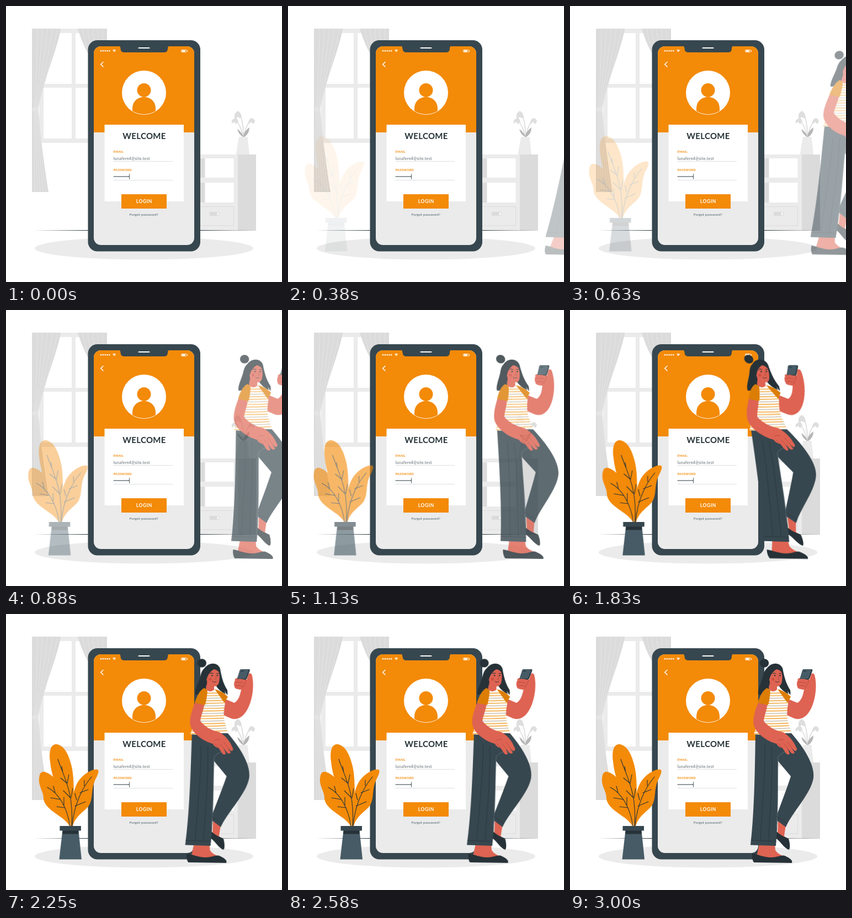
These frames come from a looping animation (500 px wide and 500 px high, 3.04 s). An HTML page:

```html
<!DOCTYPE html>
<html lang="en">
<head>
<meta charset="utf-8">
<title>Login</title>
<style>
  html, body { margin: 0; width: 100%; height: 100%; overflow: hidden; background: #fff; }
  svg { display: block; width: 100vw; height: 100vh; }
  text { font-family: Lato, "Open Sans", sans-serif; }
  .orange { fill: #f38a08; }
  .slate { fill: #37474f; }
  .ink { fill: #263238; }
  .skin { fill: #de6352; }
  .pale { fill: #ebebeb; }
  .grey { fill: #dbdbdb; }
  .line { fill: none; stroke-linecap: round; stroke-linejoin: round; }
  .vein { stroke: #263238; stroke-width: 1.1; }
  .fold { stroke: #a9443a; stroke-width: .7; }
  .seam { stroke: #263238; stroke-width: .7; }
  #woman { transform-origin: 387px 267px; }
</style>
</head>
<body>
<svg viewBox="0 0 500 500">
  <defs>
    <clipPath id="disc"><circle cx="250" cy="157" r="39.3"/></clipPath>
    <clipPath id="screen"><rect x="159" y="73" width="182" height="360" rx="13"/></clipPath>
    <clipPath id="top"><path d="M361 136Q368 143 376 136L389 141Q396 152 395 164Q391 183 396 199L401 214Q366 220 333 218Q339 200 349 180L357 150Z"/></clipPath>
  </defs>

  <!-- window -->
  <path class="pale" fill-rule="evenodd" d="M60 41H175V248H60ZM68 49V141H119V49ZM126 49V141H170V49ZM68 148V240H119V148ZM126 148V240H170V148Z"/>
  <path class="grey" d="M47 41H99.5C90 88 63 148 59 184V191C61 230 70 292 77 337H47Z"/>
  <path class="grey" d="M130 41H183V100H158C148 87 139 70 130 41Z"/>
  <g id="folds" class="line" stroke="#e8e8e8" stroke-width=".8"></g>
  <rect x="48" y="184" width="11" height="7" fill="#e4e4e4"/>

  <!-- cabinet and flowers -->
  <path class="pale" d="M350 269H420V406H350Z"/>
  <path class="grey" d="M420 269H453V407H420Z"/>
  <path class="grey" d="M350 276H361V311H350ZM350 320H361V356H350Z"/>
  <path fill="#fff" d="M360.500 276H412.500V311H360.500ZM360.500 320H412.500V356H360.500Z"/>
  <path class="line" stroke="#dbdbdb" d="M350 363.500H412.500V398H350"/>
  <rect class="grey" x="369" y="373" width="18" height="7" rx="1"/>
  <rect x="382.500" y="374" width="3.500" height="5" fill="#f5f5f5"/>
  <g class="line" stroke="#c6c6c6" stroke-width="1">
    <path d="M430 237C430 220 429 206 422 193M429 237C427 222 421 211 415 205M430 237C434 220 439 211 445 204"/>
  </g>
  <path fill="#b5b5b5" d="M430 237Q431 227 441 220Q441 231 432 237ZM429 237Q421 232 419 223Q427 228 430 237Z"/>
  <path fill="#dedede" d="M420 190C412 194 413 202 416 206Q419 201 420 201Q423 204 427 203Q427 194 420 190ZM416 203Q407 205 409 213L413 210L417 214L421 210Q421 205 416 203ZM445 203Q437 206 440 214L444 210L448 214L451 209Q450 204 445 203Z"/>
  <path class="pale" d="M422 237H437.500L441 269H416.500Z"/>

  <ellipse class="pale" cx="250" cy="439" rx="198" ry="20.500"/>
  <path class="ink" d="M50 406.500L150 406V407ZM350 406L453 406.500L350 407Z"/>

  <!-- phone -->
  <rect class="slate" x="148.500" y="62" width="203.500" height="382.500" rx="17"/>
  <g clip-path="url(#screen)">
    <rect class="pale" x="159" y="73" width="182" height="360"/>
    <rect class="orange" x="159" y="73" width="182" height="156"/>
    <path class="slate" d="M204 72Q207.500 73 207.500 77Q207.500 84 214 84H287Q293 84 293 77Q293 73 296 72Z"/>
  </g>
  <path class="line" stroke="#fff" stroke-width="2" d="M240.500 76H259.500"/>
  <g id="signal" fill="#fff"></g>
  <path fill="#ffe0b5" d="M193 80Q196 77.500 199.300 80L196.100 83.800Z"/>
  <rect x="317.500" y="79.500" width="10" height="4" rx="1" fill="none" stroke="#fff" stroke-width=".8"/>
  <path fill="#fff" d="M318.500 80.300H325V82.800H318.500ZM328 80.500H329V82.500H328Z"/>
  <path class="line" stroke="#fff" stroke-width="1.500" d="M176 101.500L171.700 105.700L176 110"/>
  <circle cx="250" cy="157" r="40" fill="#fff"/>
  <g class="orange" clip-path="url(#disc)">
    <circle cx="250" cy="152.500" r="12.500"/>
    <path d="M229 200V186C229 173 238 165 250 165S271 173 271 186V200Z"/>
  </g>
  <rect x="178.500" y="215" width="143.500" height="139" fill="#fff"/>
  <text class="ink" x="250.500" y="241" font-size="15" font-weight="700" letter-spacing=".3" text-anchor="middle">WELCOME</text>
  <g class="orange" font-size="5.600" font-weight="700" letter-spacing=".25">
    <text x="194.700" y="266">EMAIL</text>
    <text x="194.700" y="299.300">PASSWORD</text>
  </g>
  <text x="194.700" y="278.500" font-size="7" letter-spacing=".35" fill="#5b656a">lunafern4@site.test</text>
  <path class="line" stroke="#cfd2d4" stroke-width=".7" d="M195 281.500H301.500M195 315.500H301.500"/>
  <g id="dots" class="slate"></g>
  <path class="line" stroke="#263238" stroke-width=".8" d="M223.500 304.500V313.500"/>
  <rect class="orange" x="209" y="341" width="82" height="26"/>
  <text x="250.300" y="357.300" font-size="8.500" font-weight="700" letter-spacing=".6" text-anchor="middle" fill="#fff">LOGIN</text>
  <text x="250" y="380" font-size="6.300" letter-spacing=".22" text-anchor="middle" fill="#455a64">Forgot password?</text>

  <g id="plant">
    <g class="orange">
      <path d="M115 384C113 354 82 314 78 267C75 243 82 235 90 236C104 238 112 255 117 276C123 302 121 345 117 384Z"/>
      <path d="M113 384C104 366 70 357 66 335C67 322 57 314 58 298C59 286 64 284 71 287C86 292 101 316 107 337C112 356 114 370 114 384Z"/>
      <path d="M117 384C114 352 117 330 125 311C132 294 151 281 163 281.500C169 283 163 294 159 302C152 318 156 334 149 346C142 357 125 364 119 384Z"/>
    </g>
    <g class="line vein">
      <path d="M92 263C104 298 121 324 117 384M101 287L99 276M109 307L97 297M109 307L112 291M115 333L102 320M116 333L119 316"/>
      <path d="M73 314C93 324 109 350 114 384M87 324L84 312M97 336L79 333M105 351L90 349M103 347L103 332"/>
      <path d="M153 295C136 315 121 346 118 384M140 311L140 301M132 324L147 318M126 337L123 325M123 348L142 340"/>
    </g>
    <path d="M100.500 392H129.500L135 444.500H94.500Z" fill="#465b66"/>
    <path class="ink" d="M101 391H129.500V398.500H100Z"/>
    <rect class="slate" x="95.500" y="384" width="38.500" height="8.500"/>
  </g>

  <g id="woman">
    <!-- hair behind -->
    <g class="ink">
      <ellipse cx="352" cy="89" rx="8.200" ry="7.800"/>
      <path d="M357 98C365 87 380 87 385 98C388 112 390 124 399 138Q400 143 399 147L394 139L396 145Q384 140 377 128L362 132C360 140 352 147 341 146C339 137 348 122 350 111Q352 102 357 98Z"/>
    </g>
    <!-- raised arm -->
    <path class="skin" d="M388 151L412 161C420 156 422 147 424 137L414 135Q410 132 413 128Q409 124 413 121Q411 117 416 116L434 119L437 109Q440 105 443 110C448 128 445 151 439 166C432 184 420 194 406 189L390 182Z"/>
    <path class="ink" d="M421 102Q422 100 424 100H437Q440 100 439 103L434 117Q433 119 431 119L417 118Z"/>
    <path fill="#465b66" d="M421 102Q422 100 424 100H435Q438 100 437 103L432 117L416 118Z"/>
    <path class="line" stroke="#263238" stroke-width="1.500" d="M424 103.500H427"/>
    <path class="skin" d="M414 119Q420 116 430 119L433 125Q432 133 426 137Q413 137 412 131Q409 127 413 124Q411 121 414 119Z"/>
    <path class="line fold" d="M414 124Q421 122 427 125M414 130Q420 128 426 131M433 119Q432 126 426 134"/>

    <!-- feet -->
    <path class="skin" d="M377 371L391 382L388 402L392 407L376 401Z"/>
    <path class="ink" d="M374 394Q383 402 392 405L396 407C399 416 399 427 396 427C388 424 381 412 374 407Z"/>
    <path class="skin" d="M343 416H371L372 428Q378 437 390 439L372 446L338 440Z"/>
    <path class="ink" d="M330 434C340 435 351 441 364 441C376 441 383 436 389 438C398 442 404 446 402 451L333 450Q329 444 330 434Z"/>

    <!-- trousers -->
    <path class="slate" d="M360 216H401C423 241 444 273 441 297C437 325 402 360 391 386L372 372C382 344 393 316 400 294L374 263Z"/>
    <path class="slate" d="M336 216H390Q396 237 377 258C376 310 378 363 373 420L327 418.500C334 360 335 280 336 216Z"/>
    <path class="line" stroke="#6c7a82" stroke-width=".7" d="M377 259C376 310 377 350 374 386M377 258Q390 246 397 250"/>
    <path class="line seam" d="M328 410L373 412M353 238C354 300 347 360 345 410M365 240C368 300 362 350 360 411M374 366L393 380"/>

    <!-- top -->
    <g clip-path="url(#top)">
      <rect x="330" y="133" width="75" height="88" fill="#fffaf2"/>
      <g id="stripes" class="line"></g>
    </g>
    <path fill="#dc7d06" d="M376 136Q391 140 400 150L394 161Q386 150 376 136Z"/>
    <path class="skin" d="M361 123H375V137Q368 144 360 136Z"/>

    <!-- lowered arm -->
    <path class="skin" d="M341 160L358 162C356 177 351 186 351 194C360 205 371 211 386 214Q399 222 406 234L411 244Q411 249 407 248L401 242L407 251Q404 255 400 251L394 243L398 253Q395 257 391 252L385 243Q377 241 374 235C356 230 338 217 333 202C330 190 336 173 341 160Z"/>
    <path class="line fold" d="M402 242L394 232M394 243L387 235M385 243L378 235M377 229Q381 226 387 228"/>
    <path fill="#dc7d06" d="M357 134L363 138Q362 155 359 165L340 161C344 149 348 139 357 134Z"/>

    <!-- face -->
    <path class="skin" d="M359 105Q365 95 380 99C386 107 385 119 383 126C380 133 372 132 366 128Q358 121 359 105Z"/>
    <path class="ink" d="M356 100Q368 89 384 98Q387 103 385 108Q381 101 374 100Q364 106 361 119Q364 128 358 133Q350 123 356 100Z"/>
    <g class="line" stroke="#263238" stroke-width="1">
      <path d="M367 108Q370 106 373 108M379 108Q381 107 383 108"/>
      <path d="M372 122Q375 125 379 122" stroke-width=".9"/>
    </g>
    <path class="line fold" d="M377 112L379 118H376"/>
    <g class="ink"><circle cx="371" cy="111.500" r="1.300"/><circle cx="380.500" cy="111.500" r="1.300"/></g>
    <circle cx="367.500" cy="118" r="2.500" fill="#cc4c3f"/>
  </g>
</svg>
<script>
  const $ = id => document.getElementById(id);

  function add(parent, tag, attrs) {
    const el = document.createElementNS("http://www.w3.org/2000/svg", tag);
    for (const k in attrs) el.setAttribute(k, attrs[k]);
    $(parent).append(el);
  }

  for (let i = 0; i < 5; i++) {
    add("signal", "circle", { cx: 172 + i * 3.8, cy: 81.2, r: 1.25 });
    add("folds", "path", {
      d: `M${57 + i * 9} 42Q${56 + i * 5} 125 ${51 + i * 1.6} 184M${51 + i * 1.6} 191Q${51 + i * 3} 260 ${52 + i * 5} 336`
    });
    add("folds", "path", { d: `M${139 + i * 9} 42Q${143 + i * 8} 70 ${155 + i * 6} 96` });
  }
  for (let i = 0; i < 11; i++) add("dots", "circle", { cx: 196 + i * 2.6, cy: 309, r: 0.95 });
  for (let i = 0; i < 17; i++) {
    const y = 143 + i * 4.6;
    add("stripes", "path", {
      d: `M330 ${y}Q366 ${y + 1.5} 405 ${y - 1}`,
      stroke: i % 3 == 2 ? "#a9a39a" : "#f2a53a",
      "stroke-width": i % 3 == 2 ? 0.9 : 1.4
    });
  }

  // Steps: [ms, shift, skew in degrees, opacity]
  const LOOP = 3040;
  function play(id, steps, easing) {
    const frames = steps.map(([ms, x, skew, opacity]) => ({
      offset: ms / LOOP, transform: `translateX(${x}px) skewX(${skew}deg)`, opacity, easing
    }));
    $(id).animate(frames, { duration: LOOP, iterations: Infinity });
  }

  play("plant", [[0, -30, 0, 0], [2580, 0, 0, 1], [LOOP, 0, 0, 1]],
    "cubic-bezier(.36, -.01, .5, 1.38)");
  play("woman", [[0, 247, -20, 0], [1800, 0, 10, 1], [2400, 0, -2, 1], [3000, 0, 0, 1], [LOOP, 0, 0, 1]],
    "ease-out");
</script>
</body>
</html>
```
